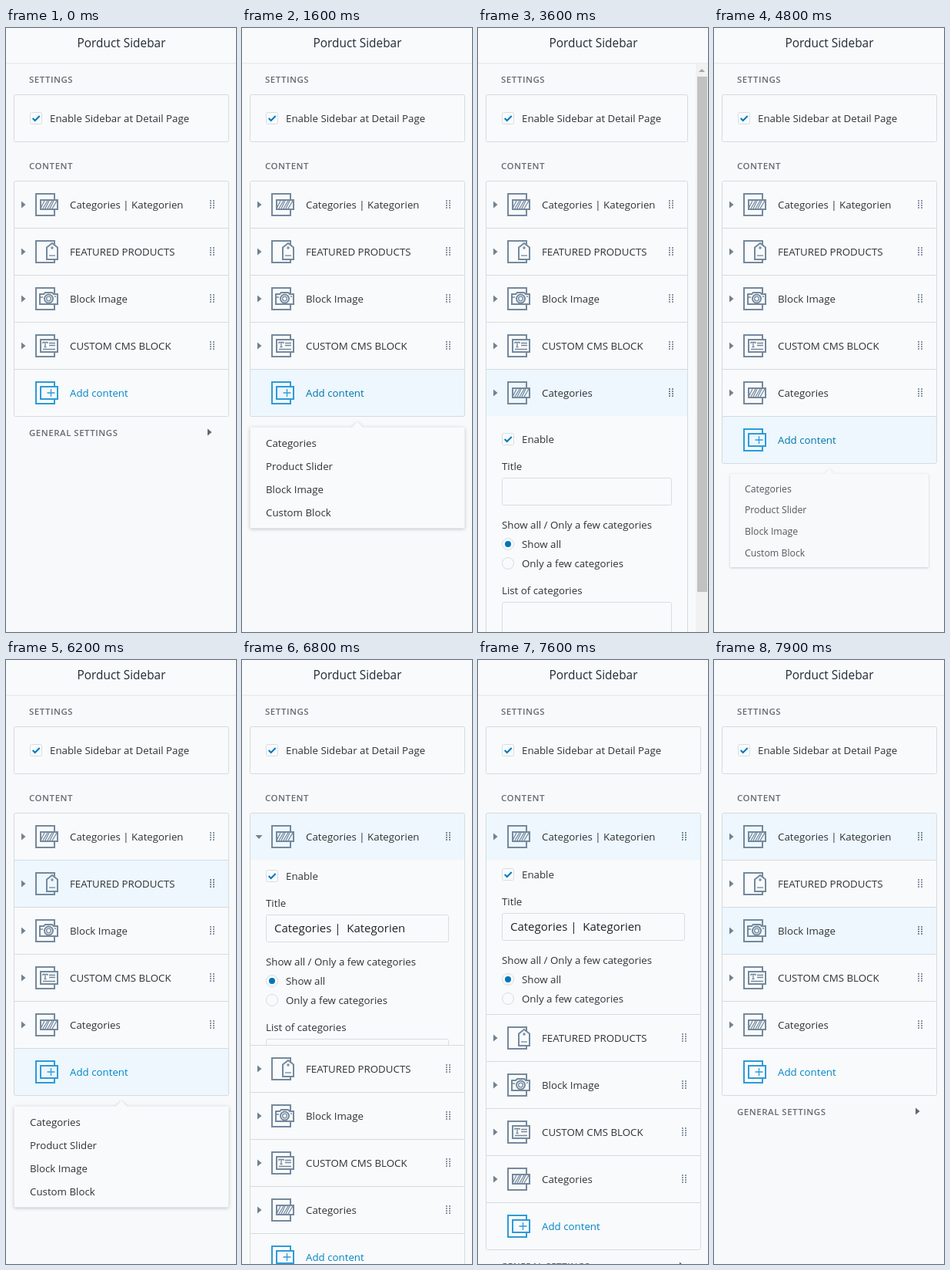
An HTML page for the animation above (8000 ms loop, 299x783 px).

```html
<!DOCTYPE html>
<html lang="en">
<head>
<meta charset="utf-8">
<title>Sidebar editor</title>
<style>
  html, body { margin: 0; width: 100%; height: 100%; overflow: hidden; background: #f8f9fb; }
  svg { display: block; }
  text { font: 13.3px "Open Sans", "Noto Sans", sans-serif; fill: #2f3337; white-space: pre; }
  .title { font-size: 15.4px; font-weight: 500; fill: #212b36; }
  .head { font-size: 11.5px; font-weight: 600; letter-spacing: .5px; fill: #666b71; }
  .field { font-size: 15px; fill: #1f2326; }
  .line { fill: none; stroke: #d5dbe0; }
  .box { fill: #f9fafb; stroke: #d5dee5; }
  .icon { fill: none; stroke: #74899d; stroke-width: 2; }
  .thin { stroke-width: 1.3; }
  .add { stroke: #2e9bd8; }
  .pop { filter: drop-shadow(0 1px 2px rgba(40, 50, 60, .3)); }
</style>
</head>
<body>
<svg id="stage" width="299" height="783" viewBox="0 0 299 783"></svg>
<script>
const LOOP = 8000, STEP = 100, ROW = 61, PANEL = 480, TOP = 198.5;
const stage = document.getElementById('stage');
const clamp = v => Math.max(0, Math.min(1, v));

// Linear track through [time, value] points.
function track(points, t) {
  let [t0, v0] = points[0];
  if (t <= t0) return v0;
  for (const [t1, v1] of points) {
    if (t < t1) return v0 + (v1 - v0) * (t - t0) / (t1 - t0);
    t0 = t1; v0 = v1;
  }
  return v0;
}

const lastOpen = [[2500, 0], [2600, .3], [2700, .76], [2800, 1], [3500, 1], [3600, .95], [3700, .45], [3800, .2], [3900, .04], [4000, 0]];
const firstOpen = [[6600, 0], [6700, .2], [6800, .5], [6900, .84], [7000, 1], [7400, 1], [7500, .67], [7600, 5 / 12], [7700, .2], [7800, .04], [7900, 0]];
const popShow = [[1300, 0], [1400, .3], [1500, .65], [1600, 1], [2400, 1], [2500, .5], [2600, 0],
  [4600, 0], [4700, .3], [4800, .65], [4900, 1], [6500, 1], [6600, .5], [6700, 0]];

// Pointer stays: row, from, to.
const hovers = [
  ['1', 500, 600], ['2', 600, 800], ['3', 800, 900], ['add', 900, 2500],
  ['4', 2900, 3900], ['add', 4000, 6600], ['1', 6100, 6300], ['0', 6400, 8000], ['2', 7800, 8000]
];
const glow = (row, t) => Math.max(0, ...hovers.filter(h => h[0] === row)
  .map(([, a, b]) => Math.min(clamp((t - a + STEP) / 200), clamp((b - t + STEP) / 200))));

const text = (x, mid, s, cls = '', more = '') =>
  `<text x="${x}" y="${Math.round(mid + 4.8)}" class="${cls}" ${more}>${s}</text>`;
const rect = (x, y, w, h, cls, r = 2) =>
  `<rect x="${x}" y="${y}" width="${w}" height="${h}" rx="${r}" class="${cls}"/>`;
const fill = (x, y, w, h, color, o = 1) =>
  `<rect x="${x}" y="${y}" width="${w}" height="${h}" fill="${color}" opacity="${o}"/>`;
const path = (d, cls = '') => `<path d="${d}" class="${cls}"/>`;
const ring = (x, y, r, cls = '') => `<circle cx="${x}" cy="${y}" r="${r}" class="${cls}"/>`;

// Page outline, open on the right between a and b.
const sheet = (a, b) => path(`M25 ${a}V1H1v28h24V${b}`);
const hatch = [0, 1, 2, 3, 4, 5].map(i => `M${7 + i * 3} 20l${5 + i % 2} -10`).join('');
const icons = {
  list: sheet(9, 21) + path('M7 9h22v12H7z') + path(hatch, 'thin'),
  tag: sheet(6, 25) + path('M15 25V9.5L22 4l7 5.5V25z') + ring(22, 10, 1, 'thin') + path('M18 20h8', 'thin'),
  camera: sheet(8, 22) + path('M6 9h5l2-2h9l2 2h5v13H6z') + ring(17.5, 15, 5.5) +
    ring(17.5, 15, 2.8, 'thin') + path('M25 12h2M6 13h4', 'thin'),
  text: sheet(7, 23) + path('M7 7h22v16H7z') +
    path('M10 12v-1.5h6V12M13 10.5v6M11.5 16.5h3M18 11.5h8M18 14.5h8M10 19.5h16', 'thin'),
  plus: sheet(7, 23) + path('M7 7h22v16H7z') + path('M20.5 10v10M15.5 15h10', 'thin')
};
const icon = (name, mid, cls = '') =>
  `<g class="icon ${cls}" transform="translate(38 ${mid - 15})">${icons[name]}</g>`;

function dots(x, mid, dark) {
  let s = '';
  for (let i = 0; i < 8; i++)
    s += fill(x + i % 2 * 4, Math.round(mid) - 6 + (i >> 1) * 3, 2, 2, dark > .5 ? '#7a8b9a' : '#8a98a6');
  return s;
}

const arrow = (mid, down) =>
  `<path d="${down ? `M17.5 ${mid - 2}h9l-4.5 5z` : `M20 ${mid - 4.5}l5.5 4.5-5.5 4.5z`}" fill="#71828f"/>`;

const check = (mid, label) => rect(31.5, mid - 7.5, 15, 15, 'box') +
  `<path d="M34.7 ${mid}l3 3 6-6" fill="none" stroke="#0079bd" stroke-width="2"/>` + text(57, mid, label);

const radio = (mid, label, on) => ring(39, mid, 7.5, 'box') +
  (on ? `<circle cx="39" cy="${mid}" r="4" fill="#0076b8"/>` : '') + text(57, mid, label);

function panel(y, k, right, value) {
  const o = Math.round(y + .5 + 20 * k), w = right - 52.5;
  return `<clipPath id="cut"><rect x="10" y="${y}" width="290" height="${PANEL * k}"/></clipPath><g clip-path="url(#cut)">` +
    check(o + 10, 'Enable') + text(31, o + 45, 'Title') + rect(31.5, o + 60.5, w, 35, 'box') +
    text(42, o + 78.5, value, 'field') + text(31, o + 121, 'Show all / Only a few categories') +
    radio(o + 146, 'Show all', true) + radio(o + 171, 'Only a few categories', false) +
    text(31, o + 206, 'List of categories') + rect(31.5, o + 221.5, w, 217, 'box') + '</g>';
}

function popover(base, p, active) {
  if (p <= 0) return '';
  const top = base + 14, tip = top - 7, scale = .785 + .215 * p;
  const items = ['Categories', 'Product Slider', 'Block Image', 'Custom Block'];
  return `<g opacity="${clamp(p * 1.25)}" transform="translate(150 ${tip}) scale(${scale}) translate(-150 ${-tip})">` +
    `<path class="pop" fill="#f9fafb" d="M12.5 ${top}H143l7-7 7 7h130.5q2 0 2 2v127q0 2-2 2h-275q-2 0-2-2v-127q0-2 2-2z"/>` +
    items.map((s, i) => text(31, top + 20.5 + i * 30, s, '', i === active ? 'style="fill:#0079bd"' : '')).join('') + '</g>';
}

function activeItem(t) {
  if (t >= 2000 && t < 2600) return 0;
  if (t >= 5100 && t < 5200) return 0;
  if (t >= 5200 && t < 5600) return 1;
  return t >= 5600 && t < 6100 ? 2 : -1;
}

function scrollbar(bottom) {
  const view = 783 - 47, thumb = 703 * Math.min(1, view / (bottom - 47));
  return fill(283, 47, 16, 736, '#f1f1f1') + fill(285, 63, 13, thumb, '#c1c1c1') +
    '<path d="M287 57l4-4 4 4z" fill="#a3a3a3"/>';
}

function view(t) {
  const bar = (t >= 2700 && t <= 3600) || (t >= 6900 && t <= 7500);
  const right = bar ? 272.5 : 289.5, wide = right - 10.5;
  const first = track(firstOpen, t), last = track(lastOpen, t), pop = track(popShow, t);
  const rows = [
    ['list', 'Categories | Kategorien', first, t >= 6600 && t < 7500],
    ['tag', 'FEATURED PRODUCTS', 0], ['camera', 'Block Image', 0], ['text', 'CUSTOM CMS BLOCK', 0]
  ];
  if (t >= 2500) rows.push(['list', 'Categories', last, t < 3600]);

  let y = TOP, body = '';
  rows.forEach(([name, label, k, down], i) => {
    const mid = y + 30.5, hot = glow(String(i), t);
    body += fill(11, y + .5, wide - 1, 60, '#edf7fd', hot) + arrow(mid, down) + icon(name, mid) +
      text(83, mid, label) + dots(right - 24.5, mid, hot);
    y += ROW;
    if (k > 0) {
      body += panel(y, k, right, i ? '' : 'Categories |  Kategorien');
      y += Math.round(PANEL * k);
    }
    body += path(`M10.5 ${y}H${right}`, 'line');
  });
  const over = (t >= 1200 && t < 2300) || (t >= 4500 && t < 5100);
  body += fill(11, y + .5, wide - 1, 60, '#edf7fd', glow('add', t)) + icon('plus', y + 30.5, 'add') +
    text(83, y + 30.5, 'Add content', '', `style="fill:${over ? '#0073ad' : '#0084c7'}"`);
  y += ROW;

  const g = y + 21, ax = right - 27.5;
  const general = text(30, g, 'GENERAL SETTINGS', 'head') +
    `<path d="M${ax} ${g - 5}l5.5 4.5-5.5 4.5z" fill="#5f676e"/>`;
  const popBase = t <= 2500 ? 503.5 : 564.5;
  // The bar runs one step ahead of the closing panel.
  const ahead = y + PANEL * (track(lastOpen, t + STEP) - last + track(firstOpen, t + STEP) - first);
  return fill(0, 0, 299, 783, '#f8f9fb') + text(30, 66.5, 'SETTINGS', 'head') +
    `<rect x="10.5" y="86.5" width="${wide}" height="61" rx="2" fill="#f9fafb" stroke="#d5dbe0"/>` +
    check(117, 'Enable Sidebar at Detail Page') + text(30, 178.5, 'CONTENT', 'head') +
    `<rect x="10.5" y="${TOP}" width="${wide}" height="${y - TOP}" rx="2" fill="#f9fafb"/>` + body +
    rect(10.5, TOP, wide, y - TOP, 'line') + (pop > .5 ? '' : general) +
    popover(popBase, pop, activeItem(t)) + (bar ? scrollbar(ahead + 41) : '') +
    fill(0, 0, 299, 46, '#f9fafc') + fill(0, 45, 299, 1, '#e8ecef') + fill(0, 46, 299, 1, '#f0f2f4') +
    text(150, 20, 'Porduct Sidebar', 'title', 'text-anchor="middle"');
}

let shown = -1;
function tick() {
  const t = Math.floor(performance.now() % LOOP / STEP) * STEP;
  if (t !== shown) stage.innerHTML = view(shown = t);
  requestAnimationFrame(tick);
}
tick();
</script>
</body>
</html>
```
